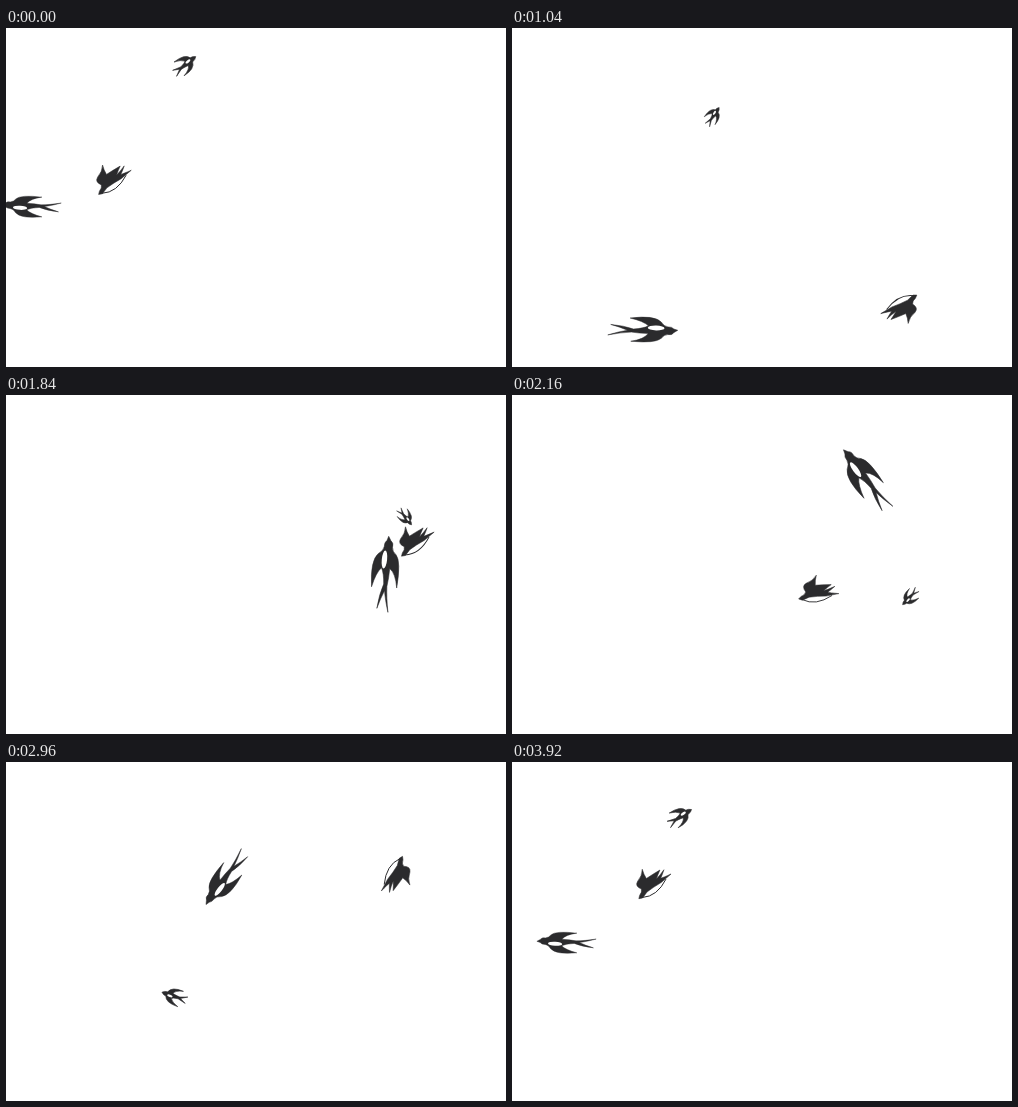
Recreate the animation shown at these times as an HTML page. Size 500 px wide and 339 px high, loop 4 s.

```html
<!DOCTYPE html>
<html lang="en">
<head>
<meta charset="utf-8">
<title>Swallows</title>
<style>
  html, body { margin: 0; width: 100%; height: 100%; overflow: hidden; background: #fff; }
  svg { display: block; width: 500px; height: 339px; }
  .ink { fill: #2b2b2d; stroke: #2b2b2d; stroke-width: .5; stroke-linejoin: round; }
  .line { fill: none; stroke: #2b2b2d; stroke-width: .9; }
  .pale { fill: #fff; }
</style>
</head>
<body>
<svg viewBox="0 0 500 339">
  <!-- every bird is drawn around its middle, flying to the right -->
  <g id="large">
    <path class="ink" d="M35-1L31 1.5Q29 4.5 25 3.6Q21 4 18.5 7.5Q13 13-12.5 11.3Q1 9 5 3Q-4 3-12 2Q-22 2.5-36 5.4Q-24 1.5-16 .2Q-24-3-33.3-5.3Q-20-4.5-10-1.2Q0-2 5-4.8Q0-9.5-13.7-12.3Q11-16 18-9Q21-4.5 25-4.2Q29-4.5 31-2.2Z"/>
    <ellipse class="pale" cx="13" cy="-2.8" rx="8.5" ry="2.5"/>
  </g>
  <g id="medium">
    <path class="ink" d="M20.5-1.5L17-3Q14-2 10-.5Q2 0-7-.6L-20 1Q-11 2.5-9 3.2Q-12 5-16.5 8.5Q-10 6-5 5Q-9 8-13 10.5Q-4 11 3 11Q3 16 1.2 21Q5 15.5 12 13.5Q17 11 13 5Q14 2 18 .8Z"/>
    <path class="line" d="M-13-.4Q4-10 17-2.4"/>
  </g>
  <g id="small">
    <path class="ink" d="M12 0Q10 2 7 2Q5 8-6.5 7Q1 5.5 2 2Q-3 1-5 1L-12 3.3L-6 0L-11.5-3L-4-1Q1-1.5 2-2.8Q0-6-6-8Q6-8 7.5-2.2Q10-2 12 0Z"/>
    <ellipse class="pale" cx="4" cy="-.9" rx="2.6" ry="1.1"/>
  </g>
</svg>
<script>
const LOOP = 4000, STEP = 80, RAD = Math.PI / 180;
const wave = (t, peak) => Math.cos((t - peak) / LOOP * 2 * Math.PI);

// a few waypoints per bird: time, x, y, heading in degrees
const birds = [
  { id: 'large', scale: t => (64.5 + 8 * wave(t, 1850)) / 68, way: [
    [0, 25, 178, 183], [200, -18, 122, -50], [560, 146, 181, 135],
    [800, 67, 257, 115], [1120, 172, 301, -5], [1520, 334, 263, -38],
    [2160, 354, 84, -126], [2560, 278, 73, 183], [3360, 160, 162, 179],
    [3920, 54, 180, 183]] },
  { id: 'medium', scale: () => 1, way: [
    [0, 109, 154, 147], [280, 50, 237, 95], [560, 156, 298, 0],
    [1120, 420, 258, -35], [1520, 467, 150, -90], [2160, 307, 201, 176],
    [2360, 236, 174, -95], [2560, 255, 128, -3], [2960, 386, 112, -55],
    [3360, 276, 63, 200], [3920, 143, 124, 146]] },
  { id: 'small', scale: t => 1 + wave(t, 3600) / 6, way: [
    [0, 179, 37, -38], [560, 250, 95, 120], [960, 196, 104, -85],
    [1520, 309, 78, 3], [2160, 398, 202, 134], [2560, 294, 250, 180],
    [3360, 86, 159, -108], [3920, 168, 55, -33]] }
];

// an arc-like curve between two waypoints that leaves and arrives on their headings
function arc([t0, x0, y0, a0], [t1, x1, y1, a1], t) {
  const turn = (a1 - a0 + 900) % 360 - 180;
  const pull = Math.hypot(x1 - x0, y1 - y0) / Math.cos(turn / 4 * RAD) ** 2;
  const u = (t - t0) / (t1 - t0), v = 1 - u;
  const axis = (p, q, trig) => {
    const m = pull * trig(a0 * RAD), n = pull * trig(a1 * RAD);
    return {
      at: v * v * (1 + 2 * u) * p + u * u * (3 - 2 * u) * q + u * v * (v * m - u * n),
      speed: 6 * u * v * (q - p) + v * (1 - 3 * u) * m + u * (3 * u - 2) * n
    };
  };
  const x = axis(x0, x1, Math.cos), y = axis(y0, y1, Math.sin);
  return [x.at, y.at, Math.atan2(y.speed, x.speed) / RAD];
}

for (const b of birds) {
  b.el = document.getElementById(b.id);
  b.way.push([LOOP, ...b.way[0].slice(1)]);
}

const start = performance.now();
function draw() {
  const t = Math.floor((performance.now() - start) % LOOP / STEP) * STEP;
  for (const { el, way, scale } of birds) {
    const next = way.findIndex(w => w[0] > t);
    const [x, y, angle] = arc(way[next - 1], way[next], t);
    el.setAttribute('transform', `translate(${x} ${y}) rotate(${angle}) scale(${scale(t)})`);
  }
  requestAnimationFrame(draw);
}
draw();
</script>
</body>
</html>
```
